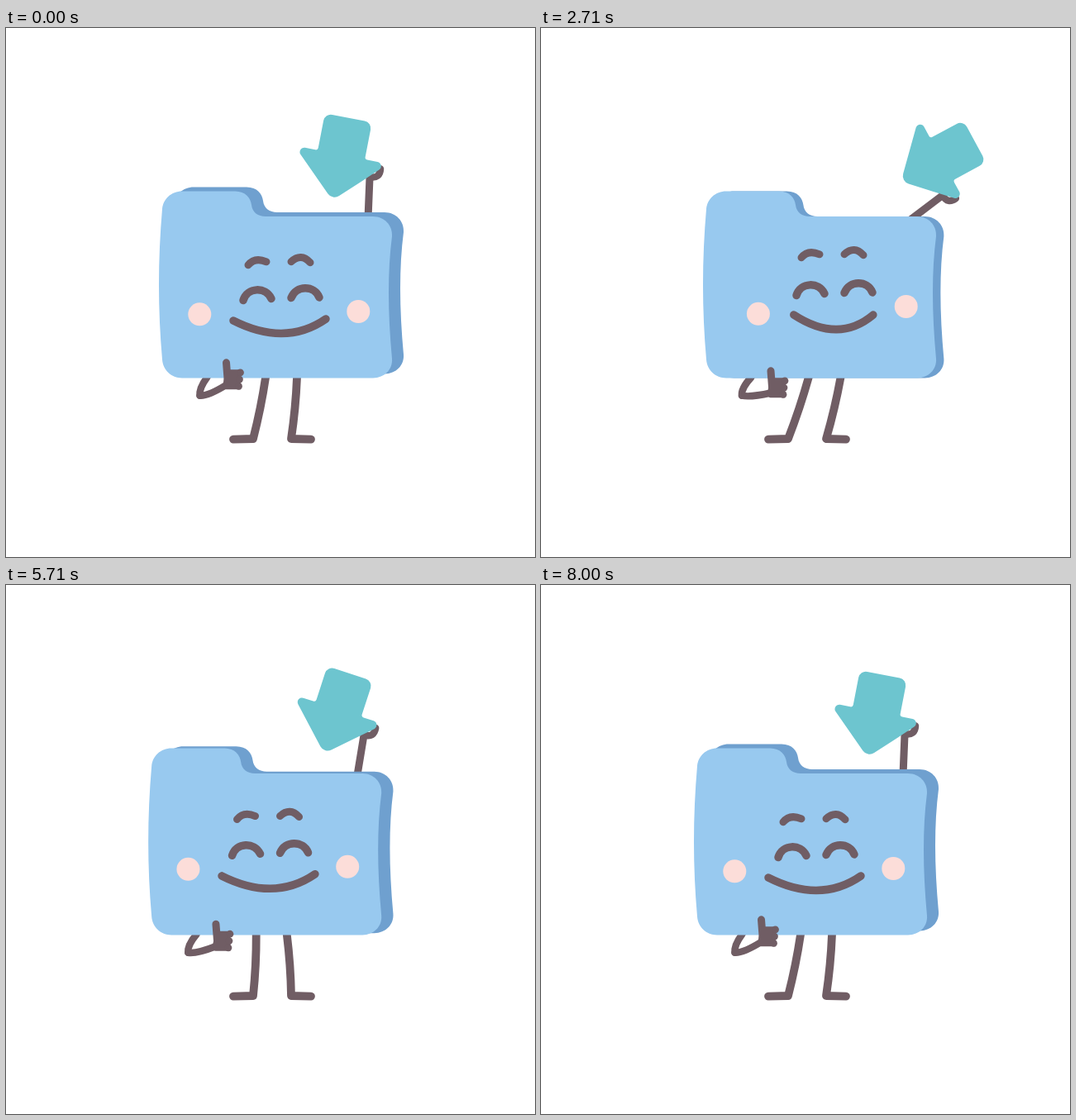
An HTML page with a canvas for the animation above (8.07 s loop, 640 by 640 pixels).

```html
<!DOCTYPE html>
<html lang="en">
<head>
<meta charset="utf-8">
<title>Happy folder</title>
<style>
html, body { margin: 0; width: 100%; height: 100%; overflow: hidden; background: #fff; }
canvas { display: block; width: 640px; height: 640px; }
</style>
</head>
<body>
<canvas id="stage" width="640" height="640"></canvas>
<script>
const ctx = document.getElementById('stage').getContext('2d');
const LOOP = 8070, FPS = 14, REST = 11, RAD = Math.PI / 180;
const BROWN = '#705d64', FRONT = '#98c9ef', BACK = '#6fa0cf', TEAL = '#6dc5cf', PINK = '#fcddd9';

const clamp = u => Math.min(1, Math.max(0, u));

function pose(t) {
  const ease = (from, to) => {
    const u = clamp((t - from) / (to - from));
    return u * u * (3 - 2 * u);
  };
  const bump = (from, to) => Math.sin(Math.PI * clamp((t - from) / (to - from))) ** 2;
  const lean = ease(0, 1250), settle = ease(5100, 7250);
  return {
    sway: 11 * lean - 27 * ease(3050, 3950) + 16 * settle,
    turn: 11 * lean - 11.8 * ease(3050, 4050) + .8 * settle,
    nod: 1 - lean + .5 * ease(4900, 5900) + .5 * ease(6300, 8000),
    arm: REST + 50.5 * ease(0, 1300) - 36 * ease(3250, 4250) - 7.5 * bump(5000, 6500) - 14.5 * ease(6400, 8000),
    dip: 4 * bump(0, 900)
  };
}

const folder = new Path2D('M213 197.5H277C290 197.5 296 206 297 214C298 223 305 228 314 228H444' +
  'C458 228 468 239 467 252Q459 314 467 400C468 413 458 423.4 444 423.4H213' +
  'C200 423.4 190 414 189 401Q181 311 189 219C190 207 200 197.5 213 197.5Z');

// Corners as x, y, rounding; the right half mirrors the left
const half = [[-57.8, -5.5, 5.3], [-29, -5.5, 3], [-29, -51, 9]];
const corners = [[0, 50.5, 10], ...half, ...half.map(([x, y, r]) => [-x, y, r]).reverse()];
const arrow = new Path2D();
arrow.moveTo(29, 22.5);
corners.forEach(([x, y, r], i) => {
  const [nx, ny] = corners[(i + 1) % corners.length];
  arrow.arcTo(x, y, nx, ny, r);
});
arrow.closePath();

function line(d, width) {
  ctx.strokeStyle = BROWN;
  ctx.lineWidth = width;
  ctx.stroke(new Path2D(d));
}

function fill(path, color) {
  ctx.fillStyle = color;
  ctx.fill(path);
}

function dot(x, y, r, color) {
  const p = new Path2D();
  p.arc(x, y, r, 0, 7);
  fill(p, color);
}

function at(x, y, draw) {
  ctx.save();
  ctx.translate(x, y);
  draw();
  ctx.restore();
}

// Drawn around the shoulder
function raisedArm(angle) {
  ctx.rotate((angle - REST) * RAD);
  line('M3.5 14L6 -47', 9);
  line('M6.5 -48Q18.5 -46 19 -58', 8.5);
  at(-29.4, -69.5, () => {
    ctx.rotate(REST * RAD);
    fill(arrow, TEAL);
  });
}

function leg(hip, ankle, toe) {
  line(`M${hip + 1} 417L${hip} 423Q${(hip + ankle) / 2 + 2} 460 ${ankle} 497L${toe} 497.7`, 9.8);
}

function face(turn, lift) {
  at(turn, lift * 1.5 + .8, () => {
    line('M293 286Q301 276 315 282', 9);
    line('M345 282Q357 271 368 283', 9);
  });
  at(turn, lift + .5, () => {
    line('M287 329C292 313 314 312 321 327', 9.5);
    line('M345 326C351 310.5 373 310.5 379 325.5', 9.5);
  });
  dot(234.3 + 1.6 * turn, 346.3 + lift + .5 * turn, 14, PINK);
  dot(426.3 + .4 * turn, 343 + lift, 14, PINK);
  line(`M${275 + 1.8 * turn} ${354 + lift - .1 * turn}` +
    `Q${338 + turn} ${386 + lift + .2 * turn} ${387 + .35 * turn} ${352 + lift + .1 * turn}`, 9.5);
}

function thumbsUp(drop) {
  at(drop * .05, drop + .3, () => {
    line('M266.5 404.5L268.5 430', 9);
    fill(new Path2D('M266 413H284V437H266Q262 437 263 428Z'), BROWN);
    for (let i = 0; i < 3; i++) dot(283.5 - i, 416.5 + 8.3 * i, 4.4, BROWN);
  });
}

function render(ms) {
  // The picture advances in steps of one fourteenth of a second
  const { sway, turn, nod, arm, dip } = pose(Math.floor(ms * FPS / 1000 + .1) * 1000 / FPS);
  const drop = 10 * (1 - nod), elbow = 234.5 - .25 * drop;
  const lift = -(1 - nod) * (4 + 2 * clamp((arm - 25.5) / 30));

  ctx.clearRect(0, 0, 640, 640);
  ctx.lineCap = ctx.lineJoin = 'round';
  leg(314 + .88 * sway, 299, 275);
  leg(352 + .95 * sway, 345, 369);
  at(sway, 0, () => {
    at(434, 228.3 + dip, () => raisedArm(arm));
    line(`M247 415L243 423Q${elbow - 1} 436 ${elbow} 444.7`, 8.5);
    at(14 - .42 * turn, -5 * nod, () => fill(folder, BACK));
    fill(folder, FRONT);
    face(turn, lift);
    line(`M${elbow} 444.7Q${elbow + 10} ${445.5 + .15 * drop} 267 ${431.5 + drop}`, 8.5);
    thumbsUp(drop);
  });
}

function tick(now) {
  render(now % LOOP);
  requestAnimationFrame(tick);
}
render(0);
requestAnimationFrame(tick);
</script>
</body>
</html>
```
